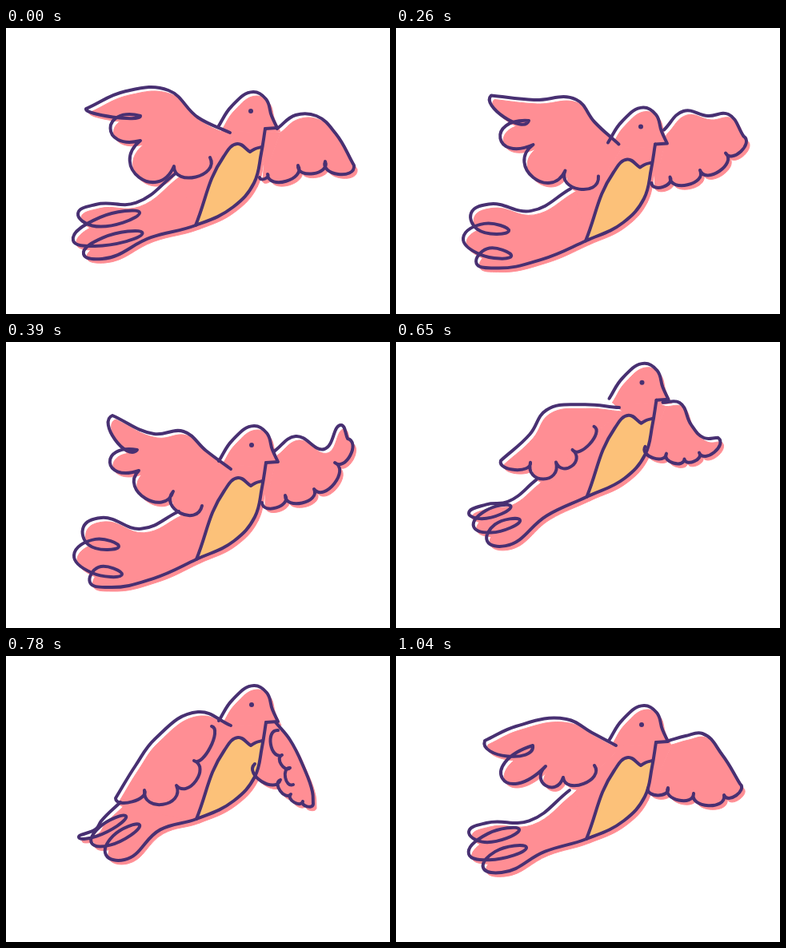
Animation, 480 px wide and 358 px high, one loop 1170 ms. Source, as an HTML page with a canvas:

```html
<!DOCTYPE html>
<html lang="en">
<meta charset="utf-8">
<title>Flying bird</title>
<style>
  html, body { margin: 0; height: 100%; overflow: hidden; background: #fff; }
  canvas { display: block; }
</style>
<canvas id="stage" width="480" height="358"></canvas>
<script>
const ctx = document.getElementById('stage').getContext('2d');
const STEP = 130, INK = '#483072', PINK = '#ff8e94', GOLD = '#fcc179';

// The body is rigid and placed relative to the eye.
const HEAD = [[-41, 20], [-24, -6], [3, -24], [19, -15], [26, 6], [33, 21]];
const BREAST = [[-69, 143], [-22, 120], [4, 90], [13, 53], [18, 22]];
const BELLY = [[-69, 143], [-34, 57], [-17, 41], [-1, 51]];
const BELLY_END = [[-1, 51], [6, 47], [14, 45]];

// Key points as x, y pairs.
// arm: upper edge of the near wing; feathers: its notches, puff: their depths;
// farArm, farNotch: the same for the far wing;
// tail: root and three lobes; loop: vector of the loops between the lobes.
const glide = {
  eye: [306, 104],
  arm: [280, 131, 240, 112, 203, 78, 150, 79, 100, 101],
  feathers: [168, 110, 168, 141, 210, 173, 255, 162], puff: [8, 50, 50, 26],
  farArm: [339, 126, 362, 109, 388, 110, 412, 132, 435, 172],
  farNotch: [399, 167, 365, 172, 327, 183, 317, 187],
  tail: [212, 182, 90, 232, 84, 266, 97, 283], loop: [80, -18]
};
const raised = {
  eye: [305, 118],
  arm: [276, 132, 247, 100, 228, 67, 160, 65, 105, 77],
  feathers: [168, 97, 177, 131, 214, 170, 261, 166], puff: [16, 57, 51, 26],
  farArm: [335, 118, 357, 90, 382, 86, 412, 112, 442, 150],
  farNotch: [413, 162, 375, 172, 336, 181, 319, 187],
  tail: [221, 190, 91, 232, 83, 259, 96, 288], loop: [54, 6]
};
const low = {
  eye: [307, 129],
  arm: [281, 159, 250, 136, 222, 112, 185, 115, 133, 92],
  feathers: [164, 135, 166, 161, 209, 187, 245, 205], puff: [20, 47, 34, 27],
  farArm: [335, 137, 362, 118, 398, 134, 419, 104, 427, 121],
  farNotch: [411, 151, 385, 184, 349, 192, 320, 201],
  tail: [216, 212, 97, 231, 85, 267, 105, 301], loop: [50, 7]
};
const folding = {
  eye: [308, 102],
  arm: [277, 133, 225, 133, 190, 104, 173, 127, 125, 145],
  feathers: [163, 167, 187, 179, 206, 183, 238, 173], puff: [15, 28, 20, 15],
  farArm: [330, 135, 354, 118, 366, 142, 387, 147, 421, 135],
  farNotch: [387, 171, 365, 192, 333, 192, 312, 189],
  tail: [208, 197, 91, 220, 87, 247, 103, 272], loop: [48, -4]
};
const down = {
  eye: [307, 61],
  arm: [281, 87, 240, 70, 186, 104, 162, 137, 137, 178],
  feathers: [173, 168, 213, 162, 235, 131, 257, 88], puff: [13, 28, 22, 14],
  farArm: [337, 83, 355, 105, 372, 139, 383, 170, 384, 185],
  farNotch: [371, 182, 356, 173, 343, 155, 311, 135],
  tail: [143, 183, 91, 227, 107, 234, 125, 249], loop: [51, -30],
  plume: [340, 93, 345, 124, 355, 140, 359, 161]
};
const rising = {
  eye: [307, 86],
  arm: [275, 112, 245, 96, 213, 79, 150, 88, 111, 106],
  feathers: [171, 112, 187, 138, 209, 152, 248, 137], puff: [22, 72, 27, 22],
  farArm: [341, 106, 362, 100, 383, 97, 408, 124, 430, 160],
  farNotch: [410, 174, 372, 172, 340, 165, 315, 165],
  tail: [217, 168, 91, 220, 91, 248, 109, 265], loop: [63, -17]
};

// Halfway pose; lift raises points in proportion to x.
function between(a, b, lift = 0) {
  const pose = {};
  for (const part in a) {
    const mid = a[part].map((v, i) => (v + b[part][i]) / 2);
    const fixed = part === 'puff' || part === 'loop';
    pose[part] = mid.map((v, i) => fixed || i % 2 === 0 ? v : v - lift * mid[i - 1]);
  }
  return pose;
}

const poses = [glide, raised, between(raised, low), low, folding,
  between(folding, down, 0.1), down, between(rising, down), rising];

const pairs = a => Array.from({ length: a.length / 2 }, (_, i) => [a[2 * i], a[2 * i + 1]]);
const add = (p, v, k = 1) => [p[0] + v[0] * k, p[1] + v[1] * k];
const mix = (p, q, t) => [p[0] + (q[0] - p[0]) * t, p[1] + (q[1] - p[1]) * t];
const dist = (p, q) => Math.hypot(q[0] - p[0], q[1] - p[1]);
const unit = (p, q) => [(q[0] - p[0]) / dist(p, q), (q[1] - p[1]) / dist(p, q)];

// Appends a smooth curve; sharper turns get shorter handles.
function curve(path, pts) {
  const handle = (i, step, len) => {
    const p = pts[i], ahead = unit(p, pts[i + step]), back = pts[i - step];
    if (!back) return add(p, ahead, len * 0.4);
    const dir = add(ahead, unit(back, p)), sum = Math.hypot(...dir) || 1;
    return add(p, dir, len * 0.4 * Math.sqrt(sum / 2) / sum);
  };
  path.lineTo(...pts[0]);
  for (let i = 0; i < pts.length - 1; i++) {
    const len = dist(pts[i], pts[i + 1]);
    path.bezierCurveTo(...handle(i, 1, len), ...handle(i + 1, -1, len), ...pts[i + 1]);
  }
  return path;
}

// Appends one rounded lobe between each pair of notches.
function scallops(path, pts, depth) {
  path.lineTo(...pts[0]);
  for (let i = 0; i < pts.length - 1; i++) {
    const a = pts[i], b = pts[i + 1], t = unit(a, b);
    const d = depth(i, dist(a, b)), spread = Math.abs(d) / 4;
    const out = p => add(p, [-t[1], t[0]], d);
    path.bezierCurveTo(...add(out(a), t, -spread), ...add(out(b), t, spread), ...b);
  }
  return path;
}

function polygon(...pts) {
  const path = new Path2D();
  pts.forEach(p => path.lineTo(...p));
  return path;
}

function tailPoints([root, top, mid, end], loop, breast) {
  const len = Math.hypot(...loop), side = [-loop[1] / len, loop[0] / len];
  const fold = (p, q) => {
    const m = mix(p, q, 0.5);
    return [add(add(m, loop, 0.25), side, 3), add(m, loop), add(add(m, loop, 0.4), side, -5)];
  };
  const bulge = (root[0] - 130) / 7, sag = 9 + loop[1] / 2.2;
  return [root, add(mix(root, top, 0.5), [bulge, bulge]), add(top, [22, -11]), top,
    ...fold(top, mid), mid, ...fold(mid, end), end, add(end, [23, 6]),
    add(mix(end, breast[0], 0.6), [0, sag]), ...breast];
}

function build(pose) {
  const p = {};
  for (const part in pose) p[part] = pairs(pose[part]);
  const eye = p.eye[0], place = pts => pts.map(v => add(eye, v));
  const skull = place(HEAD), breast = place(BREAST), throat = breast[4];
  const { arm, feathers, farArm, farNotch, tail } = p;

  const head = curve(new Path2D(), skull);
  head.lineTo(...throat);
  const wing = scallops(curve(new Path2D(), arm), [arm[4], ...feathers], i => pose.puff[i]);
  const far = scallops(curve(new Path2D(), farArm), [farArm[4], ...farNotch], (i, len) => -len / 2);
  const back = curve(new Path2D(), tailPoints(tail, p.loop[0], breast));
  const belly = curve(curve(new Path2D(), place(BELLY)), place(BELLY_END));
  const gold = curve(new Path2D(belly), breast.slice(0, 4).reverse());

  const lines = [head, wing, far, back, belly];
  if (p.plume) lines.push(scallops(new Path2D(), p.plume, (i, len) => len / 2));
  const fills = [head, wing, far, back,
    polygon(arm[0], skull[0], throat, breast[2], breast[0], tail[0], feathers[3]),
    polygon(farArm[0], throat, breast[3], farNotch[3])];
  return { fills, lines, gold, eye };
}

const birds = poses.map(build);
ctx.lineCap = ctx.lineJoin = 'round';

function draw() {
  const bird = birds[Math.floor(performance.now() / STEP) % birds.length];
  ctx.fillStyle = '#fff';
  ctx.fillRect(0, 0, 480, 358);

  // The colour is printed slightly off the line; a thin edge hides the seams.
  ctx.save();
  ctx.translate(4, 5);
  ctx.fillStyle = ctx.strokeStyle = PINK;
  ctx.lineWidth = 1;
  for (const f of bird.fills) {
    const closed = new Path2D(f);
    closed.closePath();
    ctx.fill(closed);
    ctx.stroke(closed);
  }
  ctx.restore();

  ctx.fillStyle = GOLD;
  ctx.fill(bird.gold);
  ctx.strokeStyle = ctx.fillStyle = INK;
  ctx.lineWidth = 4;
  bird.lines.forEach(l => ctx.stroke(l));
  ctx.beginPath();
  ctx.arc(...bird.eye, 3, 0, Math.PI * 2);
  ctx.fill();
  requestAnimationFrame(draw);
}
draw();
</script>
</html>
```
